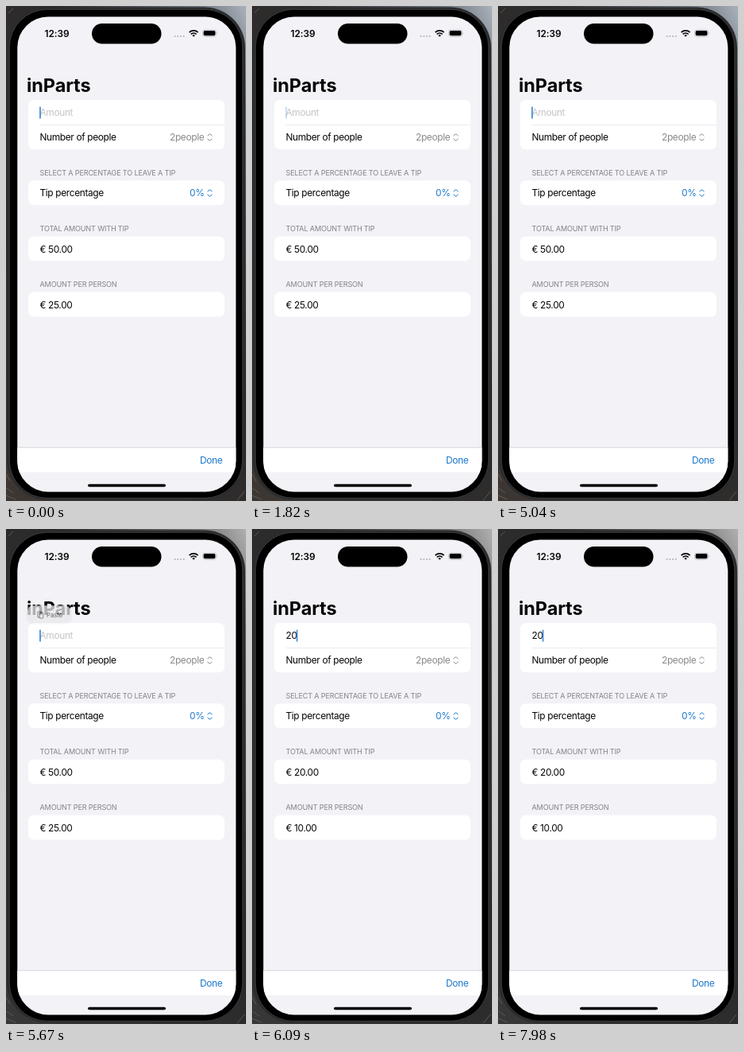
These frames come from a looping animation (302x622 px, 8000 ms). An HTML page:

```html
<!DOCTYPE html>
<html lang="en">
<head>
<meta charset="utf-8">
<title>Bill calculator</title>
<style>
  html, body { margin: 0; width: 100%; height: 100%; overflow: hidden; background: #222; }
  svg { display: block; width: 302px; height: 622px; }
  text { font: 400 11.9px Inter, Roboto, sans-serif; letter-spacing: -.35px; fill: #060606; white-space: pre; }
  .title { font-size: 23.5px; font-weight: 700; letter-spacing: -.1px; }
  .clock { font-weight: 600; letter-spacing: -.1px; }
  .head { font-size: 9.1px; letter-spacing: -.17px; fill: #848488; }
  .grey { fill: #8a8a8e; }
  .hint { fill: #c4c4c7; }
  .blue { fill: #1b78cc; }
  .card { fill: #fff; }
  .chev { fill: none; stroke: #8a8a8e; stroke-width: 1; stroke-linecap: round; stroke-linejoin: round; }
  .chev.tint { stroke: #1b78cc; }

  .desk, .empty, .one, .two, .caret, .blink, .menu { animation: 8s infinite; }
  .desk { animation-name: desk; animation-timing-function: step-end; }
  .empty { animation-name: empty; animation-timing-function: step-end; }
  .one { animation-name: one; animation-timing-function: step-end; }
  .two { animation-name: two; animation-timing-function: step-end; }
  .caret { animation-name: caret; animation-timing-function: step-end; }
  .blink { animation-name: blink; animation-timing-function: linear; }
  .menu { animation-name: menu; animation-timing-function: linear; transform-origin: 54px 119px; }
  .menu text { font-size: 9.1px; letter-spacing: 0; fill: #333; }

  @keyframes desk { 0% { filter: none; } 66.5%, 100% { filter: grayscale(1); } }
  @keyframes empty { 0% { opacity: 1; } 73.5%, 100% { opacity: 0; } }
  @keyframes one { 0% { opacity: 0; } 73.5% { opacity: 1; } 75.25%, 100% { opacity: 0; } }
  @keyframes two { 0% { opacity: 0; } 75.25%, 100% { opacity: 1; } }
  @keyframes caret {
    0% { transform: translateX(0); }
    73.5% { transform: translateX(7px); }
    75.25%, 100% { transform: translateX(13.6px); }
  }
  @keyframes blink {
    0%, 4.06%, 11.25%, 17.19%, 24.13%, 30.31%, 37.25%, 42.63%, 50.38%, 56.56%,
    62.88%, 81%, 87.5%, 93.31%, 99.5%, 100% { opacity: 1; }
    6%, 9.31%, 19.25%, 22.13%, 32.13%, 35.25%, 44.63%, 48.38%, 58.38%, 61.63%,
    82.25%, 85.5%, 95.13%, 97.5% { opacity: 0; }
  }
  @keyframes menu {
    0%, 69.9% { opacity: 0; transform: scale(.7); }
    70.88% { opacity: .75; transform: scale(.84); }
    72%, 73.4% { opacity: 1; transform: scale(1); }
    75.5%, 100% { opacity: 0; transform: scale(.95); }
  }
</style>
</head>
<body>
<svg viewBox="0 0 302 622" xmlns="http://www.w3.org/2000/svg">
  <defs>
    <linearGradient id="stone" x1="0" y1="1" x2="1" y2="0">
      <stop offset="0" stop-color="#3d3733"/>
      <stop offset=".6" stop-color="#2b2a2a"/>
      <stop offset=".9" stop-color="#6c747d"/>
      <stop offset="1" stop-color="#a9b1ba"/>
    </linearGradient>
    <filter id="soft" x="-20%" y="-30%" width="140%" height="170%">
      <feDropShadow dx="0" dy="0" stdDeviation="1.6" flood-opacity=".14"/>
    </filter>
    <clipPath id="screen"><rect x="14.3" y="13.6" width="275" height="596.8" rx="38.5"/></clipPath>
    <path id="arrows" d="M253.8 163l2.7-2.4 2.7 2.4M253.8 167l2.7 2.4 2.7-2.4"/>
  </defs>

  <g class="desk">
    <rect width="302" height="622" fill="url(#stone)"/>
    <path d="M0 588l5 9M1 606l8 6M0 615l12 5M3 9l6-6M291 621l9-11" stroke="#6a625d" stroke-width=".8" fill="none"/>
  </g>

  <!-- phone -->
  <rect x="1" y="1.5" width="300" height="619" rx="51" fill="#2a2b2d"/>
  <rect x="4.3" y="4.3" width="293.4" height="614" rx="47.5" fill="#000" stroke="#47484a" stroke-width=".8"/>

  <g clip-path="url(#screen)">
    <rect width="302" height="622" fill="#f2f2f7"/>
    <rect x="108" y="22" width="87.5" height="25.5" rx="12.75"/>

    <!-- status bar -->
    <text class="clock" x="48.6" y="38.6">12:39</text>
    <path d="M212.6 38h12" stroke="#b6b6ba" stroke-width="2.2" stroke-linecap="round" stroke-dasharray="0 3.7"/>
    <g fill="none" stroke="#000" stroke-width="1.7">
      <path d="M230.6 33.2a7.9 7.9 0 0 1 11 0M232.6 35.5a5 5 0 0 1 7 0"/>
      <path d="M236.1 38.8l-1.7-1.9a2.5 2.5 0 0 1 3.4 0z" fill="#000" stroke="none"/>
    </g>
    <rect x="247.5" y="30" width="17" height="8.4" rx="2.6" fill="none" stroke="#b4b4b8" stroke-width=".7"/>
    <rect x="248.6" y="31.1" width="14.8" height="6.2" rx="1.7"/>
    <path d="M265.8 32.8q1.5 1.4 0 2.8z" fill="#b4b4b8"/>

    <text class="title" x="26" y="108">inParts</text>

    <!-- form -->
    <g class="card">
      <rect x="28" y="118" width="247" height="62.3" rx="7"/>
      <rect x="28" y="219.3" width="247" height="31" rx="7"/>
      <rect x="28" y="289.4" width="247" height="31" rx="7"/>
      <rect x="28" y="359.6" width="247" height="31" rx="7"/>
    </g>
    <path d="M42.5 149.5H275" stroke="#e8e8eb" stroke-width=".8"/>

    <text x="42.5" y="169.2">Number of people</text>
    <text class="grey" x="206" y="169.2">2people</text>
    <use href="#arrows" class="chev"/>

    <text class="head" x="42.5" y="213.3">SELECT A PERCENTAGE TO LEAVE A TIP</text>
    <text x="42.5" y="239.4">Tip percentage</text>
    <text class="blue" x="231" y="239.4">0%</text>
    <use href="#arrows" class="chev tint" y="70"/>

    <text class="head" x="42.5" y="283.4">TOTAL AMOUNT WITH TIP</text>
    <text class="head" x="42.5" y="353.4">AMOUNT PER PERSON</text>

    <g class="empty">
      <text class="hint" x="42.5" y="138.4">Amount</text>
      <text x="42.5" y="309.6">€ 50.00</text>
      <text x="42.5" y="379.6">€ 25.00</text>
    </g>
    <g class="one" opacity="0">
      <text x="42.5" y="138.4">2</text>
      <text x="42.5" y="309.6">€ 2.00</text>
      <text x="42.5" y="379.6">€ 1.00</text>
    </g>
    <g class="two" opacity="0">
      <text x="42.5" y="138.4">20</text>
      <text x="42.5" y="309.6">€ 20.00</text>
      <text x="42.5" y="379.6">€ 10.00</text>
    </g>
    <g class="caret">
      <rect class="blink" x="42.3" y="126.4" width="1.4" height="15.4" rx=".7" fill="#1b70cc"/>
    </g>

    <g class="menu" opacity="0">
      <rect x="22" y="92" width="64" height="26" rx="8" fill="#e9e9ed" filter="url(#soft)"/>
      <g fill="none" stroke="#333" stroke-width=".9" stroke-linejoin="round">
        <path d="M40 109.5h-2.6v-8.3h6.2v1.8"/>
        <rect x="40" y="103" width="5.4" height="7.8" rx=".8"/>
      </g>
      <text x="50.5" y="109.3">Paste</text>
    </g>

    <!-- toolbar -->
    <rect x="14" y="555" width="276" height="31" fill="#fff"/>
    <path d="M14 554.8h276" stroke="#cfcfd3" stroke-width=".8"/>
    <text class="blue" x="244" y="575">Done</text>
    <rect x="103" y="600.7" width="98" height="3.6" rx="1.8"/>
  </g>
</svg>
</body>
</html>
```
